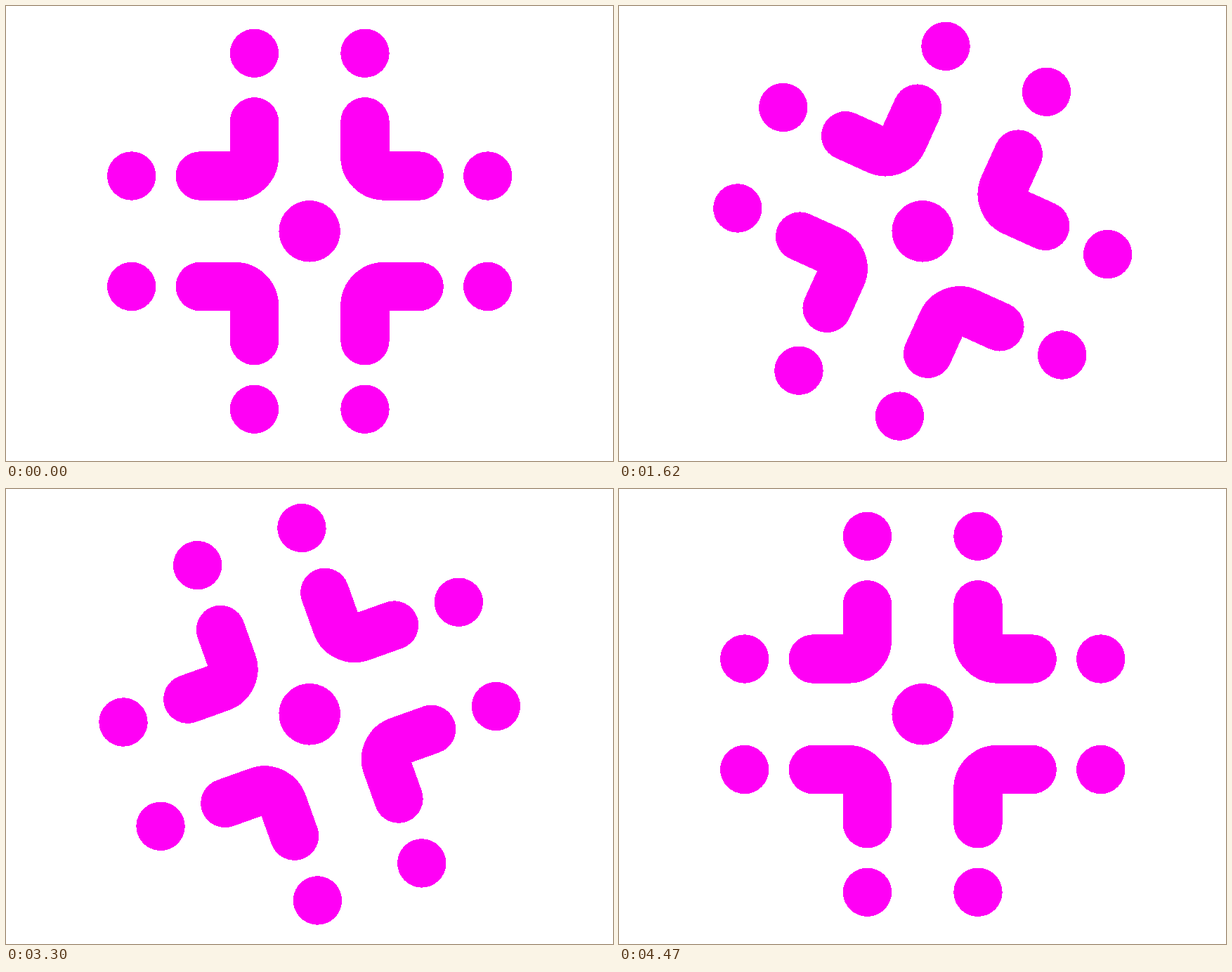
Recreate the animation shown at these times as an HTML page. Size 864 by 648 pixels, loop 4.5 s.

```html
<!DOCTYPE html>
<html lang="en">
<head>
<meta charset="utf-8">
<title>Rotating emblem</title>
<style>
  html, body { margin: 0; width: 100%; height: 100%; overflow: hidden; background: #fff; }
  svg { display: block; width: 864px; height: 648px; }
</style>
</head>
<body>
<svg viewBox="0 0 864 648" fill="#ff00f5" shape-rendering="crispEdges">
  <defs>
    <g id="quarter">
      <path d="M78.75-156V-106.25A27.5 27.5 0 0 0 106.25-78.75H156"
            fill="none" stroke="#ff00f5" stroke-width="69.4" stroke-linecap="round"/>
      <circle cx="78.75" cy="-253.5" r="34.7"/>
      <circle cx="253.5" cy="-78.75" r="34.7"/>
    </g>
  </defs>
  <g id="emblem">
    <circle r="43.8"/>
    <use href="#quarter"/>
    <use href="#quarter" transform="rotate(90)"/>
    <use href="#quarter" transform="rotate(180)"/>
    <use href="#quarter" transform="rotate(270)"/>
  </g>
</svg>
<script>
  const LOOP = 4500, STEP = 30, HALF = 2550, END = 4470;
  const emblem = document.getElementById('emblem');

  // Two linear half turns, the second one faster.
  const angleAt = t => t < HALF
    ? 180 * t / HALF
    : 180 + 180 * (t - HALF) / (END - HALF);

  function draw(now) {
    const t = Math.floor(now % LOOP / STEP) * STEP;
    emblem.setAttribute('transform', `translate(432.2 320.75) rotate(${angleAt(t)})`);
    requestAnimationFrame(draw);
  }
  draw(performance.now());
</script>
</body>
</html>
```
